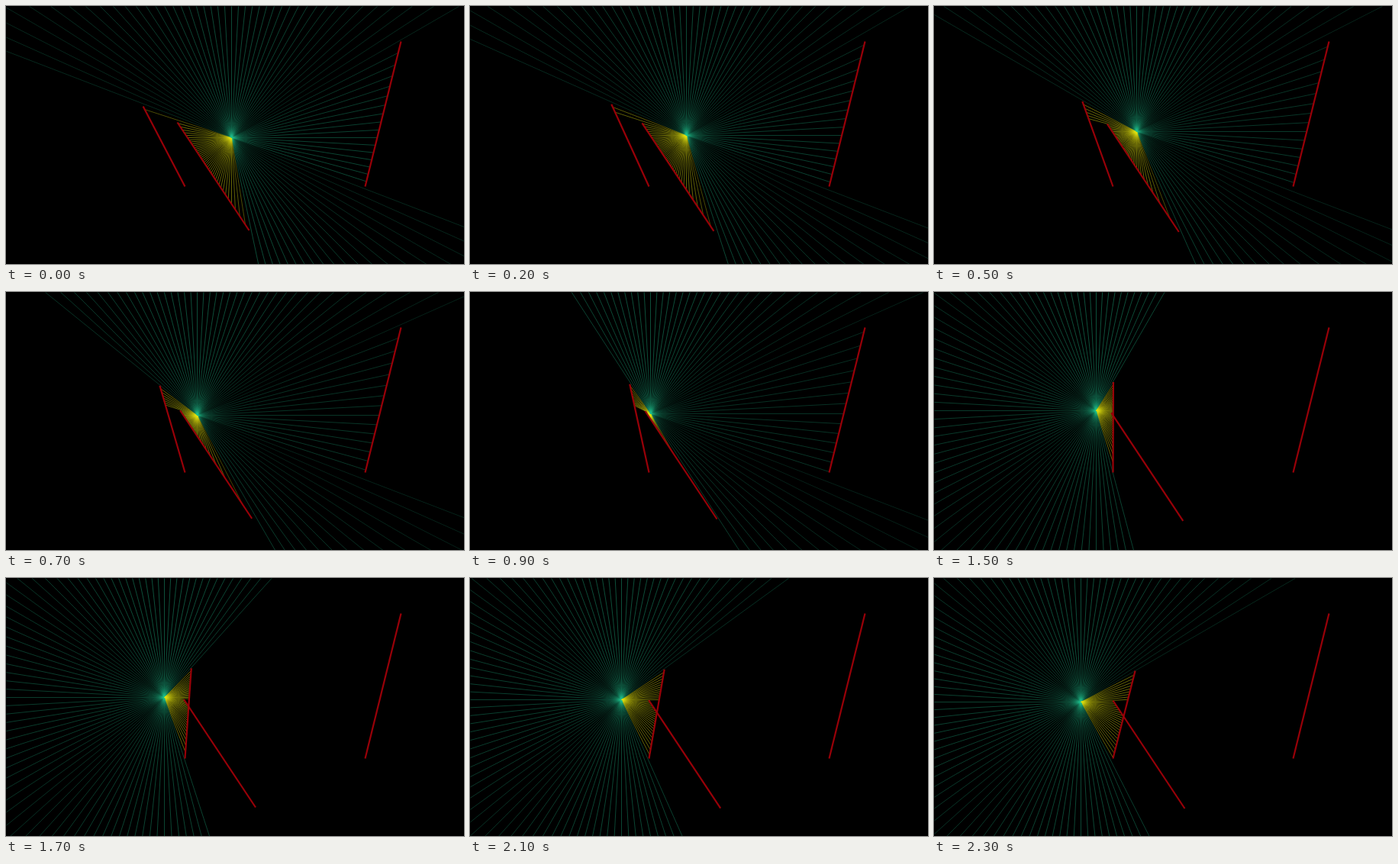
Animation of 600x338 px, one loop 2400 ms. Source, as an HTML page with a canvas:

```html
<!DOCTYPE html>
<html lang="en">
<head>
<meta charset="utf-8">
<title>Ray casting</title>
<style>
  html, body { margin: 0; width: 100%; height: 100%; overflow: hidden; background: #000; }
  canvas { display: block; }
</style>
</head>
<body>
<canvas id="stage" width="600" height="338"></canvas>
<script>
const W = 600, H = 338, LOOP = 2400, STEP = 100, RAYS = 120;
const ctx = document.getElementById('stage').getContext('2d');
ctx.translate(0.5, 0.5); // coordinates name pixel centres

// step, light x, light y, swing angle in degrees, slide x, slide y
const keys = [
  [0, 295, 172, -27.6, 224, 152],
  [5, 265, 164, -19.8, 226.3, 154],
  [9, 236, 159, -12.3, 229, 155.5],
  [13, 218.5, 155, -3.9, 231, 157],
  [17, 207, 156, 4, 232.5, 158.5],
  [21, 198, 159, 9.8, 233.7, 159.7],
  [23, 191.5, 162, 14.2, 234, 160]
];
const pivot = { x: 234, y: 236, length: 118.5 };
const near = { color: '#e0e010', reach: 40 };
const far = { color: '#20be8c', reach: 66 };
const rad = deg => deg * Math.PI / 180;

function slope(i, col) {
  const a = keys[Math.max(0, i - 1)];
  const b = keys[Math.min(keys.length - 1, i + 1)];
  return (b[col] - a[col]) / (b[0] - a[0]);
}

// Cubic Hermite through the keys
function valueAt(t, col) {
  let i = 0;
  while (i < keys.length - 2 && t > keys[i + 1][0]) i++;
  const a = keys[i], b = keys[i + 1], span = b[0] - a[0];
  const u = (t - a[0]) / span, v = 1 - u;
  return a[col] * (1 + 2 * u) * v * v + b[col] * (3 - 2 * u) * u * u
    + span * u * v * (v * slope(i, col) - u * slope(i + 1, col));
}

function hitWall(x, y, dx, dy, [x1, y1, x2, y2]) {
  const ex = x2 - x1, ey = y2 - y1;
  const det = dx * ey - dy * ex;
  if (Math.abs(det) < 1e-9) return Infinity;
  const dist = ((x1 - x) * ey - (y1 - y) * ex) / det;
  const along = ((x1 - x) * dy - (y1 - y) * dx) / det;
  return dist > 0 && along >= 0 && along <= 1 ? dist : Infinity;
}

function edgeDistance(x, y, dx, dy) {
  const toX = dx > 0 ? (W - x) / dx : dx < 0 ? -x / dx : Infinity;
  const toY = dy > 0 ? (H - y) / dy : dy < 0 ? -y / dy : Infinity;
  return Math.min(toX, toY);
}

function line(x1, y1, x2, y2) {
  ctx.beginPath();
  ctx.moveTo(x1, y1);
  ctx.lineTo(x2, y2);
  ctx.stroke();
}

function draw(step) {
  // The light moves on whole pixels
  const x = Math.round(valueAt(step, 1)), y = Math.round(valueAt(step, 2));
  const [swing, sx, sy] = [3, 4, 5].map(col => valueAt(step, col));
  const tipX = pivot.x + pivot.length * Math.sin(rad(swing));
  const tipY = pivot.y - pivot.length * Math.cos(rad(swing));
  const walls = [
    [517, 46, 470, 236],
    [tipX, tipY, pivot.x, pivot.y],
    [sx, sy, sx + 94, sy + 141.5]
  ];

  ctx.globalAlpha = 1;
  ctx.fillStyle = '#000';
  ctx.fillRect(-1, -1, W + 2, H + 2);

  ctx.lineWidth = 1;
  for (let i = 0; i < RAYS; i++) {
    const angle = rad(i * 360 / RAYS);
    const dx = Math.cos(angle), dy = Math.sin(angle);
    const wall = Math.min(...walls.map(w => hitWall(x, y, dx, dy, w)));
    const dist = Math.min(wall, edgeDistance(x, y, dx, dy));
    const ray = wall < 150 ? near : far;
    ctx.strokeStyle = ray.color;
    ctx.globalAlpha = Math.min(0.45, ray.reach / dist); // long rays are fainter
    line(x, y, x + dx * dist, y + dy * dist);
  }

  ctx.globalAlpha = 1;
  ctx.lineWidth = 2.2;
  ctx.strokeStyle = '#980008';
  walls.forEach(w => line(...w));
}

const start = performance.now();
let shown = -1;
function tick() {
  const step = Math.floor((performance.now() - start) % LOOP / STEP);
  if (step !== shown) draw(shown = step);
  requestAnimationFrame(tick);
}
tick();
</script>
</body>
</html>
```
